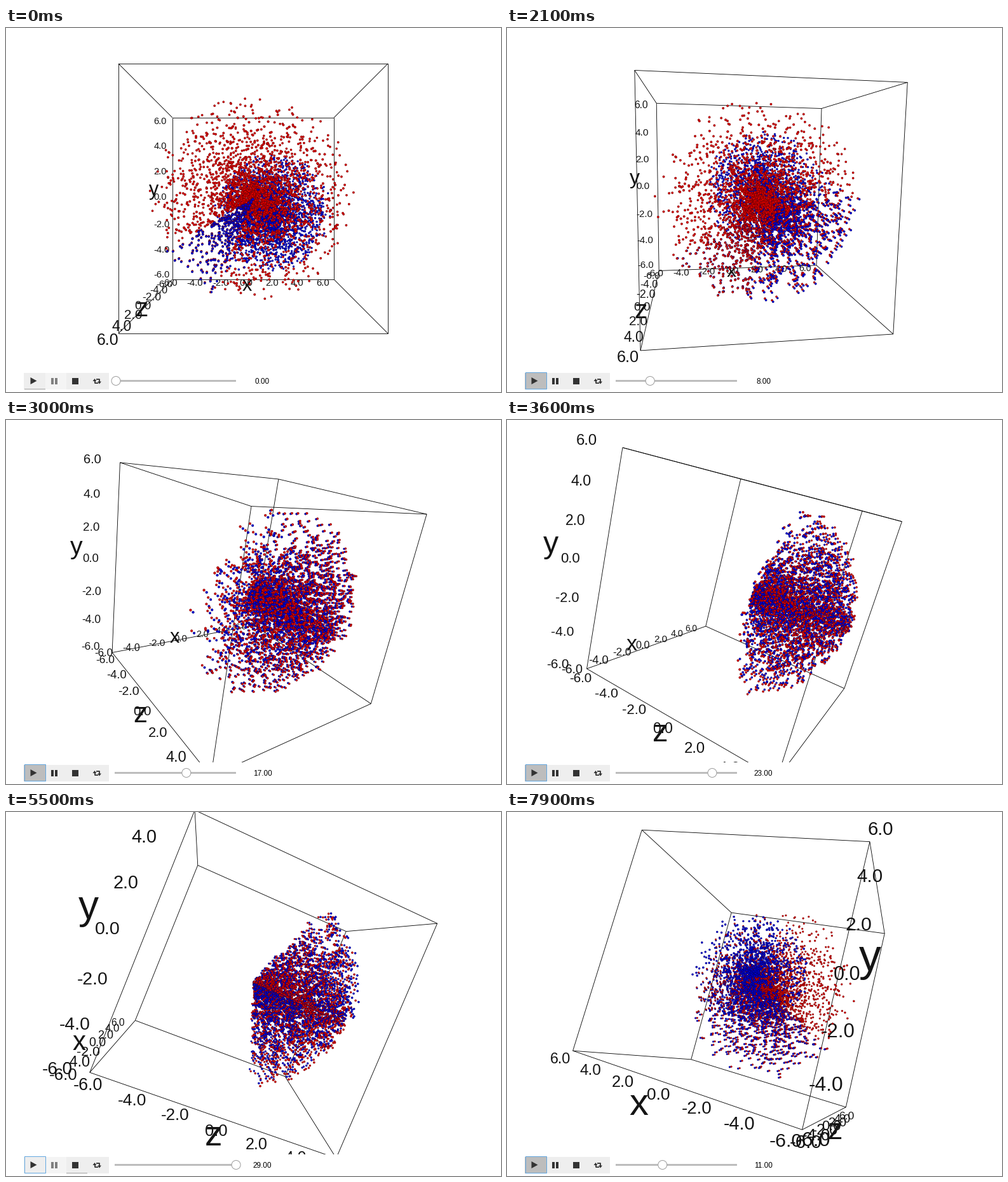
Recreate the animation shown at these times as a matplotlib script. Size 779 by 572 pixels, loop 8 s.

```python
import itertools

import matplotlib.pyplot as plt
import numpy as np
from matplotlib.animation import FuncAnimation
from matplotlib.collections import LineCollection
from matplotlib.patches import Circle, Polygon, Rectangle

W, H, STEP, FRAMES = 779, 572, 100, 80
CX, CY, FOCAL, DIST = 389, 268, 636, 2.0
DOMAIN = 6.2
FONT = "Liberation Sans"

fig = plt.figure(figsize=((W + 0.01) / 72, (H + 0.01) / 72), dpi=72, facecolor="white")
ax = fig.add_axes([0, 0, 1, 1])
ax.set_xlim(0, W)
ax.set_ylim(H, 0)
ax.axis("off")

# Camera keys: time, then the world x and y directions seen by the camera
FRONT = (1, 0, 0), (0, 1, 0)
SIDE = (-.125, .094, -.987), (.382, .922, .039)
KEYS = [
    (1500, *FRONT),
    (2100, (.986, .006, -.163), (.009, .992, .119)),
    (3000, (.772, .0945, -.6215), (.153, .931, .328)),
    (4300, (-.039, .119, -.991), (.377, .9215, .096)),
    (4600, *SIDE),
    (7100, *SIDE),
    (7900, (-.9025, .186, -.385), (.2535, .956, -.123)),
]
KEY_T = [k[0] for k in KEYS]
KEY_V = np.array([k[1] + k[2] for k in KEYS], float)


def unit(v):
    return v / np.linalg.norm(v)


def camera(ms):
    v = np.array([np.interp(ms, KEY_T, col) for col in KEY_V.T])
    ex = unit(v[:3])
    ey = unit(v[3:] - ex * (v[3:] @ ex))
    return np.array([ex, ey, np.cross(ex, ey)])


def project(points, rot):
    cam = np.asarray(points, float) @ rot
    depth = DIST - cam[:, 2]
    xy = np.column_stack([CX + FOCAL * cam[:, 0] / depth,
                          CY - FOCAL * cam[:, 1] / depth])
    return xy, depth


def slider_value(ms):
    if ms < 1300:
        return 0
    if ms < 6000:
        return min(29, (ms - 1300) // 100)
    if ms < 6800:
        return 0
    if ms <= 7100:
        return (ms - 6700) // 100
    return round(4 + (ms - 7100) * 7 / 800)


# Particles: a cone around +z, and a ball that unrolls into that cone
rng = np.random.default_rng(7)
N = 3100
rad = 0.5 * rng.random(N) ** 0.68
theta = np.radians(69) * rng.random(N) ** 0.88
phi = rng.uniform(0, 2 * np.pi, N)
cone = rad[:, None] * np.column_stack([np.sin(theta) * np.cos(phi),
                                       np.sin(theta) * np.sin(phi),
                                       np.cos(theta)])
ball = rng.normal(size=(N, 3))
ball *= (0.29 * rng.random(N) ** 0.75 / np.linalg.norm(ball, axis=1))[:, None]
sweep = (np.degrees(phi) + 150) % 360
layer = np.tanh(cone[:, 1] * (rad - 0.3) * 150)


def blue_points(t):
    front = np.interp(t, [0, 8, 17], [65, 185, 395])
    age = front - sweep
    w = np.clip(age / 30, 0, 1)[:, None]
    a = np.radians(-35 + 10 * t)
    orbit = 0.12 * max(0, 1 - t / 17)
    home = ball + [orbit * np.cos(a), orbit * np.sin(a), -0.03]

    # Fresh arrivals lie over their partners, older ones sink behind
    late = np.clip((t - 17) / 10, 0, 1)
    gap = 0.005 * np.clip(t / 17, 0.2, 1) * (1 - 0.7 * late)
    end = cone + [gap, -gap, 0]
    end[:, 2] += np.where(age < 135, 0.012, -0.012) * (1 - late)
    end[:, 0] -= 0.04 * layer * late
    return home * (1 - w) + end * w


def cloud(ms):
    blue = blue_points(slider_value(ms))
    if 6000 <= ms < 6200:
        blue = (blue + blue_points(29)) / 2
    return np.vstack([cone, blue])


FACE = np.repeat([[.86, 0, 0], [0, 0, .84]], N, axis=0)
EDGE = np.repeat([[.42, 0, 0], [0, 0, .42]], N, axis=0)

dots = ax.scatter(np.zeros(2 * N), np.zeros(2 * N), s=9, c=FACE, linewidths=0.5, zorder=3)

# Box
CORNERS = np.array(list(itertools.product((-.5, .5), repeat=3)))
EDGES = [(i, j) for i, j in itertools.combinations(range(8), 2)
         if np.sum(CORNERS[i] != CORNERS[j]) == 1]
box = LineCollection([], colors="black", linewidths=0.85, zorder=1)
ax.add_collection(box)

# Labels: anchor, screen shift, em size, centre height, sideways shift when turned round
labels = []


def add_label(text, anchor, shift, em, mid, turn):
    art = ax.text(0, 0, text, family=FONT, color="#141414", ha="center",
                  va="baseline", zorder=2, clip_on=True)
    labels.append((art, anchor, shift, em, mid, turn))


def add_axis(k, name, tick_at, title_at, pos, neg, title_shift, mid, turn):
    for v in range(-6, 7, 2):
        p = np.array(tick_at, float)
        p[k] = v / DOMAIN / 2
        add_label(f"{v:.1f}", p, neg if v < 0 else pos, 37.8, 0.35, turn)
    add_label(name, np.array(title_at, float), title_shift, 81, mid, turn / 2)


add_axis(0, "x", (0, -.53, -.55), (0, -.56, -.63), (-28, 0), (-28, 0), (-26, 3), .26, 20)
add_axis(1, "y", (-.59, 0, -.59), (-.644, 0, -.644), (-4, -9), (2, 1), (-3, -25), .155, -28)
add_axis(2, "z", (-.55, -.527, 0), (-.553, -.55, 0), (2, 0), (4, -3), (0, 0), .26, -28)
ANCHORS = np.array([entry[1] for entry in labels])


def rect(x0, y0, x1, y1, color, z, edge="none"):
    return ax.add_patch(Rectangle((x0, y0), x1 - x0, y1 - y0, facecolor=color,
                                  edgecolor=edge, linewidth=1, zorder=z))


# Control bar
DARK = "#333333"
BTN, PRESSED, FOCUS = "#eeeeee", "#bdbdbd", "#64a8e0"
rect(0, 538, W, H, "white", 5)
buttons = [rect(x, 542, x + 33.5, 568, BTN, 6) for x in (28, 61.5, 95, 128.5)]
shadows = [rect(x, 567, x + 33, 568.5, "#a0a0a0", 7) for x in (28.5, 95)]
rings = [rect(x, 541.5, x + 33, 567.5, "none", 8, FOCUS) for x in (28.5, 94.5)]

ax.add_patch(Polygon([(38.5, 549), (38.5, 560), (48.5, 554.5)], color=DARK, lw=0, zorder=9))
bars = [rect(x, 550, x + 4, 560, DARK, 9) for x in (71, 77)]
rect(104, 550, 114, 560, DARK, 9)
for tip, base, path in [
    ((139.5, 551), 555, [(139.5, 554), (139.5, 558.3), (145, 558.3)]),
    ((147, 559.5), 555.5, [(147, 556), (147, 552.2), (141.5, 552.2)]),
]:
    ax.plot(*zip(*path), color=DARK, lw=1.8, zorder=9, solid_capstyle="butt")
    ax.add_patch(Polygon([tip, (tip[0] - 3, base), (tip[0] + 3, base)],
                         color=DARK, lw=0, zorder=9))

rect(171, 553, 362, 556, "#bdbdbd", 6)
knob = ax.add_patch(Circle((173, 554.5), 7, facecolor="white", edgecolor="#9e9e9e",
                           linewidth=1, zorder=7))
readout = ax.text(403.5, 559, "", family=FONT, fontsize=11.7, color="black",
                  ha="center", va="baseline", zorder=7)
margin = rect(21, 0, 22, H, "#cfcfcf", 10)


def update_controls(ms):
    playing = 1300 <= ms < 4500 or ms >= 6800
    stopping = 6000 <= ms < 6200
    buttons[0].set_facecolor(PRESSED if playing else BTN)
    buttons[1].set_facecolor(BTN if playing else "#f4f4f4")
    buttons[2].set_facecolor(PRESSED if stopping else BTN)
    rings[0].set_visible(1300 <= ms < 6000 or ms >= 6800)
    rings[1].set_visible(6000 <= ms < 6800)
    shadows[0].set_visible(ms < 1300 or 6200 <= ms < 6800)
    shadows[1].set_visible(5500 <= ms < 6200)
    for bar in bars:
        bar.set_facecolor(DARK if playing else "#808080")
    value = slider_value(ms)
    knob.center = 173 + 6.52 * value, 554.5
    readout.set_text(f"{value:.2f}")
    margin.set_visible(4900 <= ms < 5100)


def update(i):
    ms = i * STEP
    rot = camera(ms)

    xy, _ = project(CORNERS, rot)
    box.set_segments([xy[list(e)] for e in EDGES])

    flip = max(0, -rot[0, 0])
    xy, depth = project(ANCHORS, rot)
    for (art, _, shift, em, mid, turn), (x, y), d in zip(labels, xy, depth):
        art.set_position((x + (shift[0] + turn * flip) / d,
                          y + (shift[1] + em * mid) / d))
        art.set_fontsize(em / d)

    xy, depth = project(cloud(ms), rot)
    order = np.argsort(-depth)
    dots.set_offsets(xy[order])
    dots.set_sizes((5.6 / depth[order]) ** 2)
    dots.set_facecolors(FACE[order])
    dots.set_edgecolors(EDGE[order])

    update_controls(ms)
    return []


anim = FuncAnimation(fig, update, frames=FRAMES, interval=STEP, repeat=True,
                     repeat_delay=0, blit=False)
plt.show()
```
